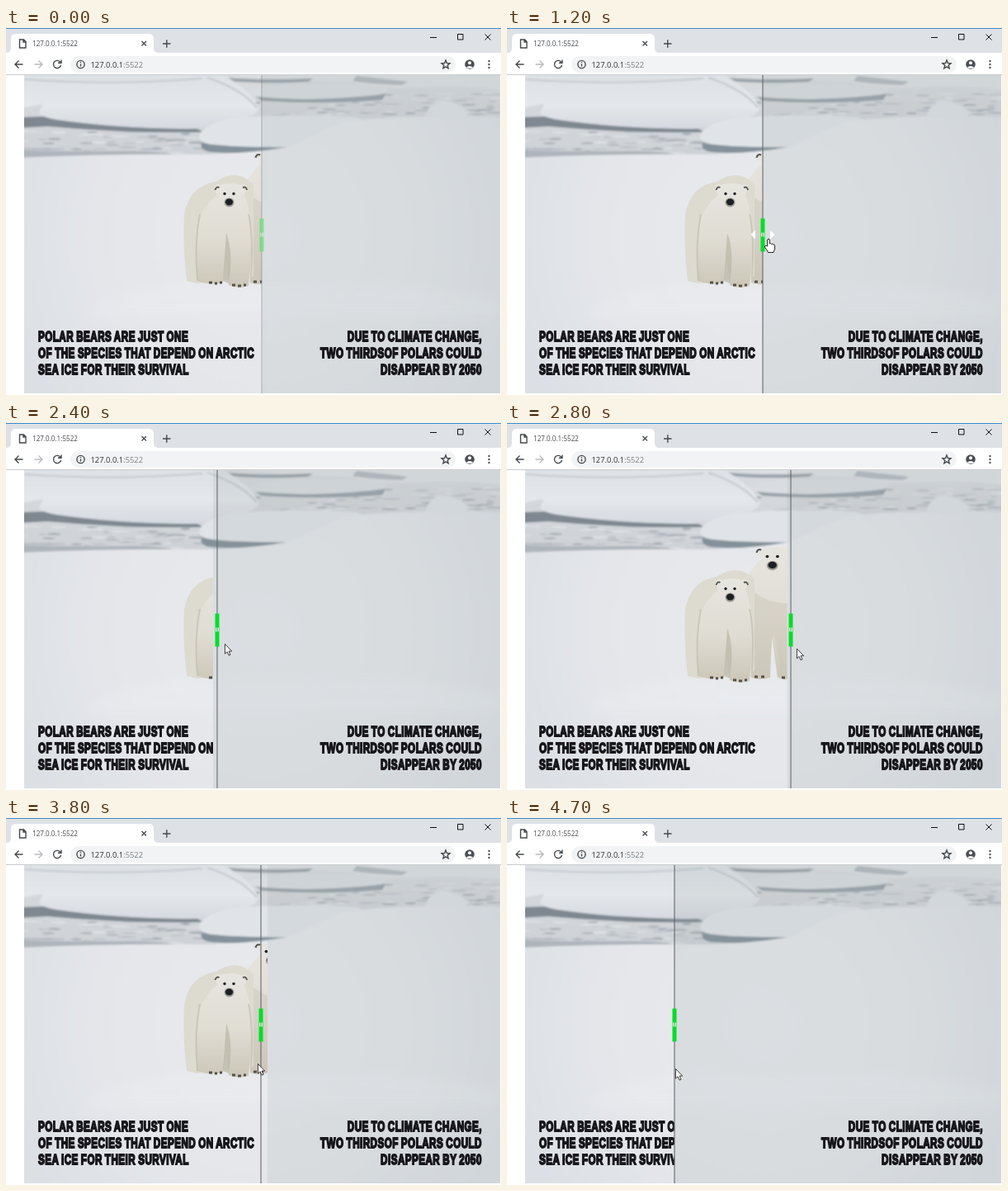
Write an HTML page that moves like this. It is 600 px wide and 444 px high and loops after 4800 ms.

```html
<!DOCTYPE html>
<html lang="en">
<head>
<meta charset="utf-8">
<title>Before and after slider</title>
<style>
  html, body { margin: 0; width: 100%; height: 100%; overflow: hidden; background: #fff; }
  svg { display: block; width: 600px; height: 444px; }
  .ui { font-family: "Open Sans", "Noto Sans", sans-serif; }
  .icon { fill: none; stroke: #45494d; stroke-width: 1.4; }
  .caption {
    font: bold 17.4px "Liberation Sans", Arial, sans-serif; letter-spacing: .7px; word-spacing: -1px;
    fill: #17171b; stroke: #17171b; stroke-width: 1.8;
  }
  .end { text-anchor: end; }
</style>
</head>
<body>
<svg viewBox="0 0 600 444">
  <defs>
    <filter id="soft" x="-5%" y="-5%" width="110%" height="110%"><feGaussianBlur stdDeviation="1.2"/></filter>
    <filter id="haze" x="-20%" y="-40%" width="140%" height="180%"><feGaussianBlur stdDeviation="7"/></filter>
    <filter id="fur" x="-5%" y="-5%" width="110%" height="110%"><feGaussianBlur stdDeviation=".7"/></filter>
    <linearGradient id="water" x2="0" y2="1">
      <stop offset="0" stop-color="#d8dbdf"/><stop offset="1" stop-color="#cdd1d6"/>
    </linearGradient>
    <linearGradient id="floe" x2="0" y2="1">
      <stop offset="0" stop-color="#dce0e4"/><stop offset=".6" stop-color="#e4e7eb"/><stop offset="1" stop-color="#d6dae0"/>
    </linearGradient>
    <radialGradient id="snow" gradientUnits="userSpaceOnUse" cx="310" cy="250" r="330">
      <stop offset="0" stop-color="#e8eaed"/><stop offset=".6" stop-color="#e4e6ea"/><stop offset="1" stop-color="#dce0e5"/>
    </radialGradient>
    <linearGradient id="coat" x2="0" y2="1">
      <stop offset="0" stop-color="#e7e5df"/><stop offset=".55" stop-color="#dfdcd3"/><stop offset="1" stop-color="#cbc6b7"/>
    </linearGradient>
    <clipPath id="photo"><path d="M22 57H599V442H22Z"/></clipPath>
    <clipPath id="reveal"><rect id="window" x="22" y="57" width="288" height="385"/></clipPath>

    <g id="scene">
      <g filter="url(#soft)">
        <path d="M15 50H606V165H15Z" fill="url(#water)"/>
        <g id="ripples"></g>
        <!-- far ice, upper right -->
        <path d="M283 50H606V75Q550 69 500 72T420 66Q340 62 283 58Z" fill="#dde0e4"/>
        <path d="M268 60Q310 64 372 61L366 65Q310 68 272 64Z" fill="#9aa2a9"/>
        <path d="M288 78Q320 66 368 68Q420 66 462 72L460 86Q400 90 300 83Z" fill="#d9dde1"/>
        <path d="M302 83Q350 88 400 85T461 79L456 87Q380 93 310 88Z" fill="#9aa2a9"/>
        <path d="M425 58Q455 61 487 65L480 69Q440 68 420 64Z" fill="#b4bac0"/>
        <!-- near floe, left -->
        <path d="M15 108L48 107Q120 121 232 122L240 126Q150 128 50 119L15 121Z" fill="#7f8890"/>
        <path d="M15 50H252Q303 78 306 98Q302 109 270 113Q235 122 218 122Q130 121 62 111Q42 108 40 102L45 92Q30 94 15 98Z" fill="url(#floe)"/>
        <path d="M22 62Q130 70 238 61M244 60Q286 74 304 96" fill="none" stroke="#c3c9d0" stroke-width="2"/>
        <path d="M15 147Q80 150 130 149T206 153L170 157H15Z" fill="#aeb5bb"/>
        <!-- middle floe -->
        <path d="M237 139Q275 146 350 142L338 148Q290 153 248 150Q234 148 237 139Z" fill="#84919a"/>
        <path d="M234 131Q238 115 280 109Q350 102 425 108L460 124L352 144Q290 145 246 140Q234 138 234 131Z" fill="#e0e4e8"/>
        <!-- snow field -->
        <path d="M15 157Q120 152 238 153Q310 151 345 143Q375 128 408 114Q470 104 606 108V450H15Z" fill="url(#snow)"/>
        <path d="M508 108Q512 90 528 87Q549 91 560 101L558 111Z" fill="#dde1e6"/>
      </g>
      <path d="M100 340Q170 308 225 308Q300 320 390 312T600 330V350H100Z" fill="#eef0f3" opacity=".3" filter="url(#haze)"/>
    </g>

    <g id="bears" filter="url(#fur)">
      <!-- larger animal -->
      <path d="M305 157Q307 149 314 153Q330 147 345 153Q354 149 355 157L350 164Q359 195 357 220Q354 240 348 262L355 309Q342 313 328 308L321 258L319 308Q306 312 296 308L288 190Q300 172 309 164Z" fill="url(#coat)"/>
      <path d="M300 205Q326 224 352 215Q352 240 343 260L347 305L334 306L323 252L316 306L300 300Z" fill="#cbc7b9" opacity=".5"/>
      <!-- smaller animal -->
      <path d="M254 186Q222 191 216 226Q214 262 219 306L232 309L300 300V190Q282 168 254 186Z" fill="#dddad0"/>
      <path d="M252 194Q254 187 260 190Q272 186 285 190Q292 188 293 195L289 201Q297 224 299 252L294 312Q281 316 270 311L267 280L263 308Q247 312 232 306Q228 266 234 232Q242 212 256 202Z" fill="url(#coat)"/>
      <path d="M267 248Q276 272 270 309L263 306Z" fill="#b9b4a5" opacity=".65"/>
      <path d="M235 225Q228 260 232 306M294 225Q300 250 297 300" fill="none" stroke="#c2beb0" stroke-width="2" opacity=".7"/>
      <g id="face" fill="#1d1f22">
        <ellipse cx="270.500" cy="211" rx="6" ry="5.500" fill="#9d9a93"/>
        <ellipse cx="270.500" cy="210.500" rx="4.600" ry="4"/>
        <circle cx="265" cy="200.500" r="1.700"/><circle cx="276" cy="200.500" r="1.700"/>
        <path d="M253.500 196Q255 191 258.500 193M287 193Q291 191 292 196" fill="none" stroke="#55554f" stroke-width="2"/>
      </g>
      <use href="#face" transform="translate(16 -47) scale(1.13 1.04)"/>
      <path d="M246 308h4m3 1h3m3-1h3M274 311h4m3 1h4m3-1h3M300 307h4m4 0h4M333 308h4m4 1h4m3-1h3" stroke="#55524a" stroke-width="3"/>
    </g>
  </defs>

  <path d="M0 0H600V444H0Z" fill="#fff"/>

  <!-- browser frame -->
  <path d="M0 0H600V30H0Z" fill="#dee1e6"/>
  <path d="M0 0H600V1H0Z" fill="#3b8bcb"/>
  <path d="M0 30Q6 30 6 24V13Q6 7 12 7H173Q179 7 179 13V24Q179 30 185 30Z" fill="#fff"/>
  <path class="icon" d="M16.500 14H21.500L24 16.500V24H16.500ZM21 14V17H24"/>
  <g class="ui">
    <text x="32" y="22" font-size="8.100" fill="#45484c">127.0.0.1:5522</text>
    <path d="M78 44a10 10 0 0 1 10-10H535a10 10 0 0 1 0 20H88a10 10 0 0 1-10-10Z" fill="#f1f3f4"/>
    <text x="102.500" y="47.700" font-size="9.400" fill="#2d3033">127.0.0.1<tspan fill="#7a7e83">:5522</tspan></text>
  </g>
  <g class="icon">
    <path d="M164.500 16l5.500 5.500m0-5.500l-5.500 5.500M190 19h9.500m-4.700-4.700v9.500"/>
    <path d="M20.500 44H11m4.500-4.500L11 44l4.500 4.500"/>
    <path d="M34.500 44H44m-4.500-4.500L44 44l-4.500 4.500" stroke="#b9bcbf" style="stroke: #b9bcbf"/>
    <path d="M66 41.500a4.600 4.600 0 1 0 .6 3.500M67 38.500v3.800h-4"/>
    <circle cx="90.500" cy="44" r="4.600"/>
    <path d="M90.500 43.500v3M90.500 41v1.200"/>
    <path d="M533 39l1.400 3.500 3.600.3-2.800 2.400.9 3.600-3.100-2-3.100 2 .9-3.600-2.800-2.400 3.600-.3Z"/>
  </g>
  <g fill="#4d5155">
    <circle cx="562" cy="44" r="5.800"/>
    <circle cx="585.500" cy="40" r="1.200"/><circle cx="585.500" cy="44" r="1.200"/><circle cx="585.500" cy="48" r="1.200"/>
  </g>
  <path d="M558 47.500q4-3 8 0l-1.500 1.200h-5Z" fill="#fff"/><circle cx="562" cy="42.300" r="2" fill="#fff"/>
  <path d="M514 11.500h8M547.500 7.500h6.500v6.500h-6.500ZM580.500 7.500l7 7m0-7l-7 7" fill="none" stroke="#111"/>
  <path d="M0 56.500H600" stroke="#c9cccf"/>

  <!-- comparison -->
  <g clip-path="url(#photo)">
    <use href="#scene"/>
    <path d="M22 57H599V442H22Z" fill="#8d979d" opacity=".15"/>
    <g class="caption end" transform="translate(577 0) scale(.67 1)">
      <text y="379.300">DUE TO CLIMATE CHANGE,</text>
      <text y="399.300">TWO THIRDSOF POLARS COULD</text>
      <text y="419.300">DISAPPEAR BY 2050</text>
    </g>
  </g>
  <g clip-path="url(#reveal)">
    <use href="#scene"/>
    <use href="#bears"/>
    <g class="caption" transform="translate(39 0) scale(.67 1)">
      <text y="379.300">POLAR BEARS ARE JUST ONE</text>
      <text y="399.300">OF THE SPECIES THAT DEPEND ON ARCTIC</text>
      <text y="419.300">SEA ICE FOR THEIR SURVIVAL</text>
    </g>
  </g>

  <g id="slider">
    <path d="M-.5 57H.5V442H-.5Z" fill="#5a5d60"/>
    <path d="M-2.500 230.500H2.500V270.500H-2.500Z" fill="#06dd2b"/>
    <path d="M-2 247.500h1.500v5H-2ZM.5 247.500H2v5H.5Z" fill="#c6efc9"/>
    <path id="arrows" d="M-9 244.500V255.500L-14.500 250ZM9 244.500V255.500L14.500 250Z" fill="#fff"/>
  </g>
  <g id="pointer" fill="#fff" stroke="#222" stroke-linejoin="round">
    <path id="arrow" transform="scale(.87)" d="M.5 .5V14L3.600 11.200 5.800 16.300 8 15.300 5.900 10.400H10Z"/>
    <path id="hand" d="M-1.300 9V1Q0-.8 1.300 1V6Q2.700 5 3.700 6.500Q5 5.700 5.900 7Q7.500 6.600 7.600 8.500V12Q7 14 6 16.500H-.5Q-2 13-4.600 10Q-4.500 7.800-2.800 8.300Z"/>
  </g>
</svg>
<script>
const LOOP = 4800, STEP = 100;
const $ = id => document.getElementById(id);

// time, slider x, edge x (it trails the slider), pointer x, pointer y
const path = [
  [700, 310, 310, 356, 288],
  [1000, 310, 310, 317, 256],
  [1200, 310, 310, 317, 255],
  [1300, 310, 310, 315, 257],
  [1500, 287, 294, 279, 261],
  [1700, 238, 246, 228, 265],
  [1900, 196, 201, 190, 266],
  [2000, 184, 186, 182, 267],
  [2200, 204, 198, 211, 267],
  [2400, 256, 251, 265, 267],
  [2700, 326, 321, 334, 271],
  [3000, 380, 377, 385, 276],
  [3200, 395, 394, 397, 279],
  [3400, 389, 391, 387, 284],
  [3600, 355, 361, 349, 290],
  [3800, 309, 317, 305, 297],
  [4000, 259, 267, 251, 300],
  [4200, 221, 226, 216, 302],
  [4400, 205, 206, 204, 303],
  [4500, 203, 203, 204, 303]
];

function pose(t) {
  const i = path.findIndex(row => row[0] > t);
  if (i < 0) return path[path.length - 1];
  if (i === 0) return path[0];
  const a = path[i - 1], b = path[i], k = (t - a[0]) / (b[0] - a[0]);
  return a.map((v, j) => v + (b[j] - v) * k);
}

let seed = 11;
const rand = () => (seed = seed * 16807 % 2147483647) / 2147483647;

function ripples(x, y, w, h, count) {
  let marks = "";
  for (let i = 0; i < count; i++) {
    const fill = ["#e2e4e7", "#a3abb2", "#b9bfc5"][i % 3];
    marks += `<ellipse cx="${x + rand() * w}" cy="${y + rand() * h}" rx="${4 + rand() * 10}" ry="${0.5 + rand() * 0.8}" fill="${fill}"/>`;
  }
  return marks;
}
$("ripples").innerHTML = ripples(22, 124, 215, 28, 60) +
  ripples(280, 88, 180, 18, 24) + ripples(455, 78, 145, 28, 36);

const show = (id, on) => $(id).setAttribute("visibility", on ? "visible" : "hidden");

function draw() {
  const t = Math.floor(performance.now() % LOOP / STEP) * STEP;
  const [, bar, edge, x, y] = pose(t);
  const hover = t >= 1000 && t < 1300;
  $("slider").setAttribute("transform", `translate(${bar} 0)`);
  $("slider").setAttribute("opacity", 0.4 + 0.6 * Math.min(1, Math.max(0, (t - 700) / 300)));
  $("window").setAttribute("width", edge - 22);
  $("pointer").setAttribute("transform", `translate(${x} ${y})`);
  show("arrows", hover);
  show("hand", hover);
  show("arrow", t >= 700 && !hover);
  requestAnimationFrame(draw);
}
draw();
</script>
</body>
</html>
```
